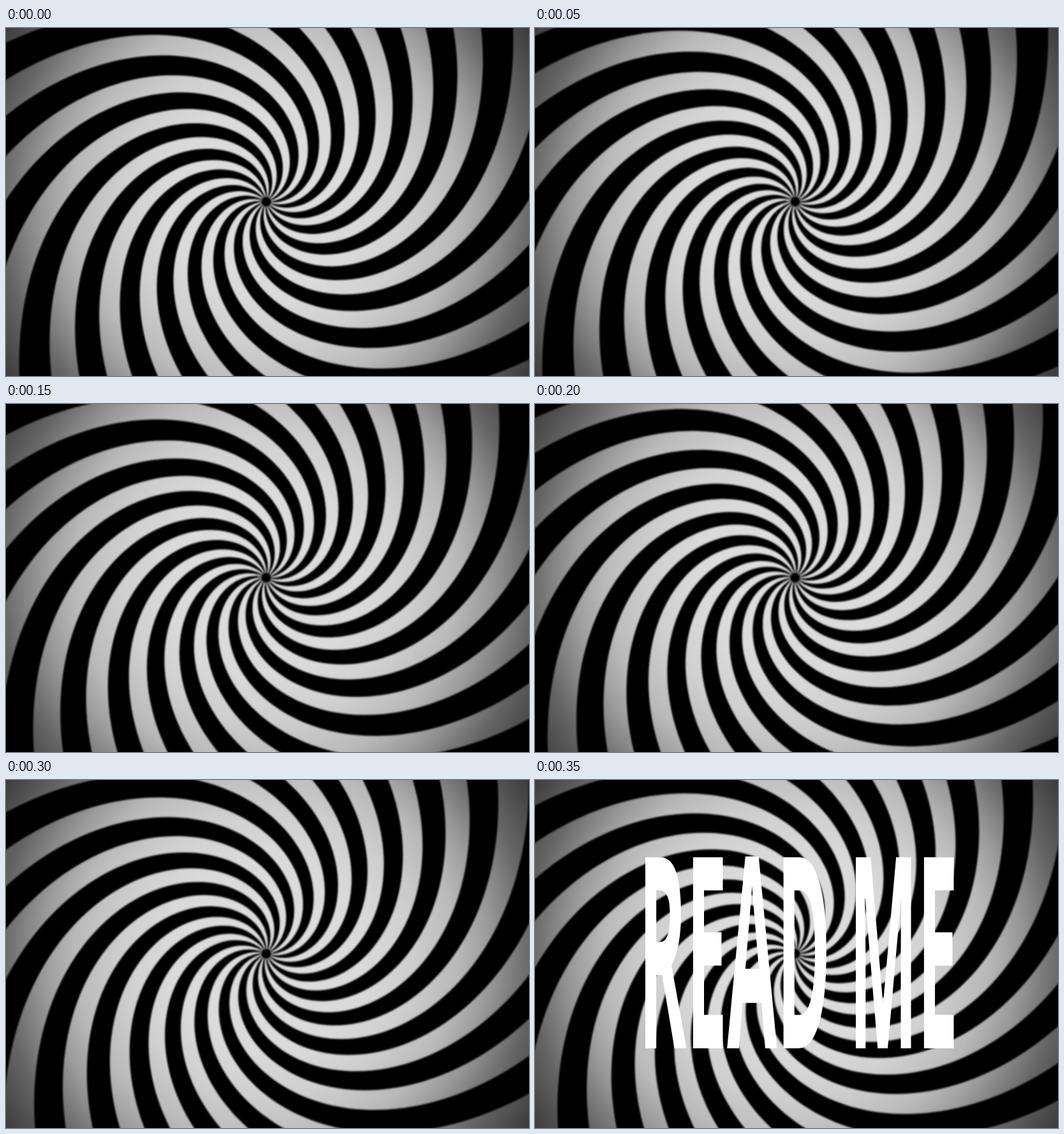
Recreate the animation shown at these times as an HTML page. Size 820 by 546 pixels, loop 0.4 s.

```html
<!DOCTYPE html>
<html lang="en">
<head>
<meta charset="utf-8">
<title>Spiral</title>
<style>
  html, body { margin: 0; width: 100%; height: 100%; overflow: hidden; background: #000; }
  svg { display: block; width: 820px; height: 546px; }
  text { font: 700 100px "Open Sans", "Noto Sans", sans-serif; fill: #fff; text-rendering: geometricPrecision; }
</style>
</head>
<body>
<svg viewBox="0 0 820 546">
  <defs>
    <radialGradient id="shade" gradientUnits="userSpaceOnUse" cx="0" cy="0" r="500">
      <stop offset="0" stop-color="#dedede"/>
      <stop offset=".3" stop-color="#dadada"/>
      <stop offset=".45" stop-color="#cfcfcf"/>
      <stop offset=".6" stop-color="#b9b9b9"/>
      <stop offset=".7" stop-color="#9a9a9a"/>
      <stop offset=".84" stop-color="#646464"/>
      <stop offset="1" stop-color="#383838"/>
    </radialGradient>
    <filter id="soften" filterUnits="userSpaceOnUse" x="-430" y="-300" width="860" height="600" color-interpolation-filters="sRGB">
      <feGaussianBlur stdDeviation=".9"/>
    </filter>
  </defs>
  <rect width="820" height="546"/>
  <g transform="translate(408 272.5)" filter="url(#soften)">
    <path id="arms" fill="url(#shade)"/>
    <circle r="7.5"/>
  </g>
  <text id="words" opacity="0" transform="translate(162.8 421) scale(1.134 4.2)">READ ME</text>
</svg>
<script>
const ARMS = 16;
const PERIOD = 2 * Math.PI / ARMS;
const REACH = 510;
const LOOP = 400;
const WHITE_SHARE = .485;

// Angles run clockwise from straight up; the twist eases off with radius.
const twist = r => 4.18 * (1 - Math.exp(-r / 432));

function edgePoint(start, r) {
  const angle = start - twist(r);
  return `${(r * Math.sin(angle)).toFixed(2)} ${(-r * Math.cos(angle)).toFixed(2)}`;
}

function armPath(start) {
  const outward = [], inward = [];
  for (let r = 6; r <= REACH; r += 6) {
    outward.push(edgePoint(start - PERIOD * WHITE_SHARE, r));
    inward.unshift(edgePoint(start, r));
  }
  return `M${outward.concat(inward).join("L")}Z`;
}

const arms = document.getElementById("arms");
const words = document.getElementById("words");
const firstEdge = 90.2 * Math.PI / 180;
arms.setAttribute("d", Array.from({ length: ARMS }, (_, i) => armPath(firstEdge + i * PERIOD)).join(""));

// Fraction of one arm spacing reached at each 50 ms step.
const turns = [0, .092, .19, .287, .525, .645, .755, .85, 1];
const hold = "steps(1, end)";
const timing = { duration: LOOP, iterations: Infinity };

arms.animate(turns.map((turn, i) => ({
  offset: i / 8,
  transform: `rotate(${turn * 360 / ARMS}deg)`,
  easing: hold
})), timing);

words.animate([
  { offset: 0, opacity: 0, easing: hold },
  { offset: .875, opacity: 1, easing: hold },
  { offset: 1, opacity: 1 }
], timing);
</script>
</body>
</html>
```
